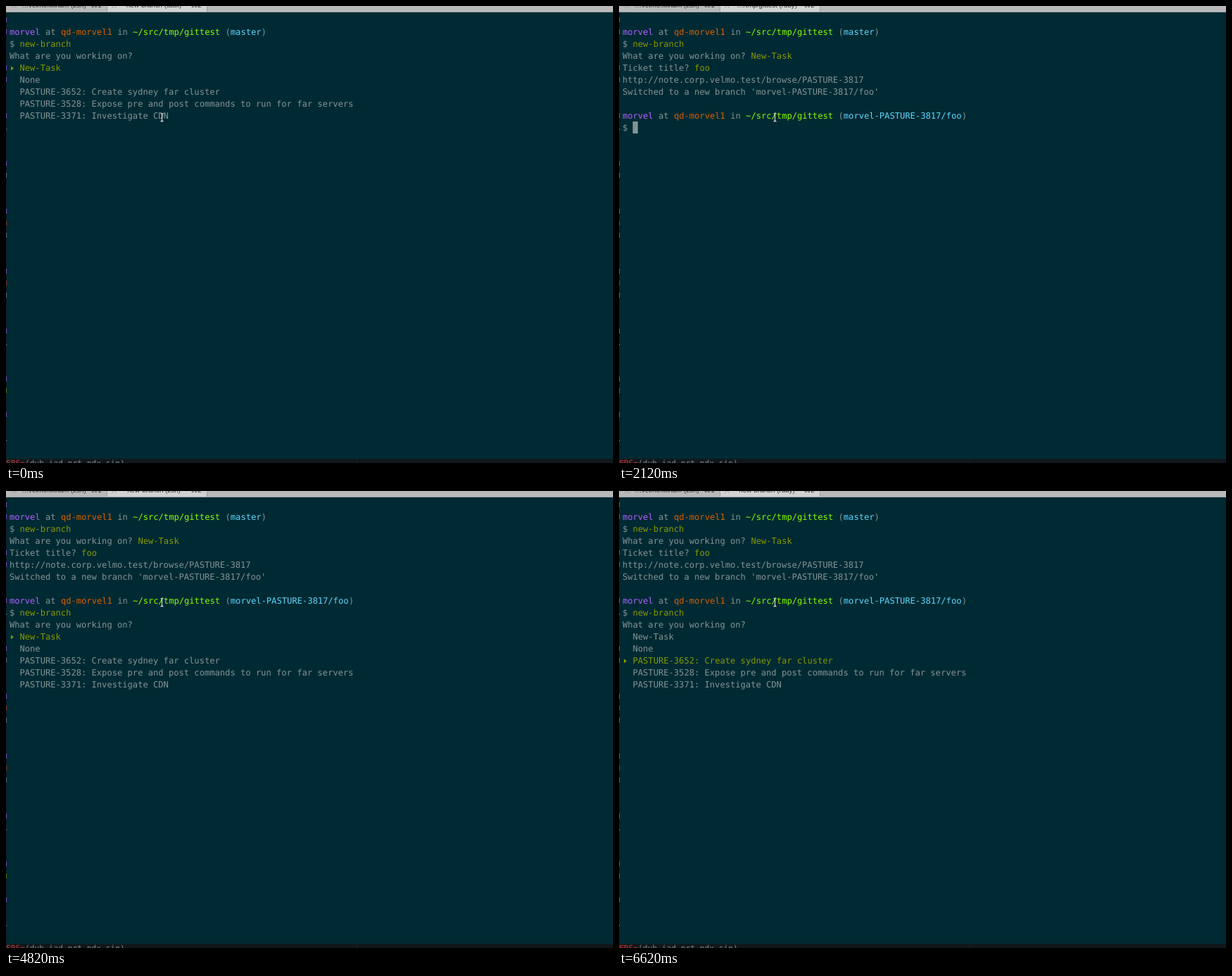
Recreate the animation shown at these times as an HTML page. Size 862x649 px, loop 8 s.

```html
<!DOCTYPE html>
<html lang="en">
<head>
<meta charset="utf-8">
<title>Terminal session</title>
<style>
  html, body { margin: 0; width: 100%; height: 100%; overflow: hidden; background: #002a33; }
  svg { display: block; width: 862px; height: 649px; }
  text { white-space: pre; text-rendering: geometricPrecision; }
  .term { font: 12.125px "DejaVu Sans Mono", monospace; }
  .below { font: 11.23px "DejaVu Sans Mono", monospace; }
  .tabs { font: 9.8px "Liberation Sans", "DejaVu Sans", sans-serif; text-anchor: middle; fill: #333; }
  .plain { fill: #839496; }
  .pick { fill: #859900; }
  .user { fill: #af5fff; }
  .host { fill: #d75f00; }
  .path { fill: #87ff00; }
  .branch { fill: #5fd7ff; }
  .red { fill: #c8382f; }
</style>
</head>
<body>
<svg viewBox="0 0 862 649">
  <rect width="862" height="649" fill="#002a33"/>

  <rect width="862" height="9" fill="#b9b9b9"/>
  <rect x="144" width="141" height="8" fill="#d2d2d2"/>
  <path d="M143.5 0V8M285.5 0V8" stroke="#9c9c9c"/>
  <path d="M0 8.5H862" stroke="#a3a9aa"/>
  <path d="M8 3l3.5-3.5l3.5 3.5M150 3l3.5-3.5l3.5 3.5" fill="none" stroke="#888" stroke-width=".8"/>
  <g class="tabs">
    <text x="68" y="2">…velmo.xx/iam (zsh)</text>
    <text x="128" y="2">⌘1</text>
    <text id="tab" x="210" y="2"></text>
    <text x="270" y="2">⌘2</text>
  </g>

  <g id="edge"></g>
  <g id="screen" class="term"></g>

  <rect y="643" width="862" height="6" fill="#10181c"/>
  <path d="M498.5 644V649" stroke="#18242a"/>
  <g class="below">
    <text x="0" y="653" class="red">ERS=</text>
    <text x="27" y="653" fill="#7d898b">(dub iad prt pdx sin)</text>
  </g>

  <path d="M219.5 152.5Q221.5 152.5 221.5 154.5V162Q221.5 164 219.5 164M223.5 152.5Q221.5 152.5 221.5 154.5M221.5 162Q221.5 164 223.5 164"
    fill="none" stroke="#dfe3e3" stroke-width="1.1"/>
</svg>
<script>
  const LOOP = 8000, LEFT = 4.9, COLUMN = 7.3, TOP = 28, ROW = 17;
  const byId = id => document.getElementById(id);
  const column = n => LEFT + n * COLUMN;
  const rowTop = n => TOP + n * ROW;

  // A line is a list of [style, text] pieces set one after another.
  const prompt = branch => [
    ['user', 'morvel'], ['plain', ' at '], ['host', 'qd-morvel1'], ['plain', ' in '],
    ['path', '~/src/tmp/gittest'], ['plain', ' ('], ['branch', branch], ['plain', ')']
  ];
  const plain = text => [['plain', text]];
  const answer = (question, reply, style = 'pick') => [['plain', question + ' '], [style, reply]];

  const question = 'What are you working on?';
  const options = [
    'New-Task',
    'None',
    'PASTURE-3652: Create sydney far cluster',
    'PASTURE-3528: Expose pre and post commands to run for far servers',
    'PASTURE-3371: Investigate CDN'
  ];
  const menu = chosen => [
    plain(question),
    ...options.map((text, i) => i === chosen
      ? [['pick', '▸ ' + text]]
      : plain('  ' + text))
  ];

  const command = answer('$', 'new-branch');
  const start = [prompt('master'), command];
  const asked = [...start, answer(question, 'New-Task')];
  const title = (text, style) => [...asked, answer('Ticket title?', text, style)];
  const created = [
    ...title('foo'),
    plain('http://note.corp.velmo.test/browse/PASTURE-3817'),
    plain("Switched to a new branch 'morvel-PASTURE-3817/foo'"),
    [],
    prompt('morvel-PASTURE-3817/foo')
  ];
  const ready = [...created, plain('$ ')];
  const again = [...created, command];
  const secondMenu = chosen => [...again, ...menu(chosen)];

  // Start time, tab title, lines, cursor as [column, row].
  const steps = [
    [0, 'new-branch (task)', [...start, ...menu(0)]],
    [300, 'new-branch (ruby)', title(''), [14, 3]],
    [1070, 'new-branch (ruby)', title('fo', 'plain'), [16, 3]],
    [1220, 'new-branch (ruby)', title('foo', 'plain'), [17, 3]],
    [1370, 'new-branch (ruby)', title('foo'), [0, 4]],
    [2120, '…/tmp/gittest (ruby)', ready, [2, 8]],
    [2420, '…/tmp/gittest (git)', ready, [2, 8]],
    [3020, '…/tmp/gittest (zsh)', ready, [2, 8]],
    [3470, '…/tmp/gittest (zsh)', again, [12, 8]],
    [4370, 'new-branch (zsh)', again, [0, 9]],
    [4820, 'new-branch (zsh)', secondMenu(0)],
    [5270, 'new-branch (ruby)', secondMenu(0)],
    [5570, 'new-branch (ruby)', secondMenu(1)],
    [6020, 'new-branch (ruby)', secondMenu(2)],
    [6170, 'new-branch (ruby)', secondMenu(3)],
    [6620, 'new-branch (ruby)', secondMenu(2)]
  ];

  function drawPiece(style, text, col, row) {
    const y = rowTop(row);
    if (text.startsWith('▸')) {
      return `<path class="${style}" d="M7 ${y + 6.5}l4 3l-4 3z"/>` +
        drawPiece(style, text.slice(2), col + 2, row);
    }
    return `<text class="${style}" x="${column(col)}" y="${y + 13}">${text}</text>`;
  }

  function drawLine(pieces, row) {
    let col = 0;
    return pieces.map(([style, text]) => {
      const piece = drawPiece(style, text, col, row);
      col += text.length;
      return piece;
    }).join('');
  }

  const drawCursor = ([col, row]) =>
    `<rect class="plain" x="${column(col)}" y="${rowTop(row)}" width="7.3" height="17"/>`;

  // Slivers of the window behind, one mark per text row.
  const edgeRows = {
    user: [-1, 0, 3, 4, 7, 11, 15, 20, 25, 29, 32],
    red: [16, 21],
    plain: [12, 17, 22],
    pick: [30]
  };
  const mark = (style, row, height = 7) =>
    `<rect class="${style}" y="${rowTop(row) + 12 - height}" width="1" height="${height}" opacity=".65"/>`;
  byId('edge').innerHTML = '<rect y="9" width="1" height="634" fill="#0b1d24"/>' +
    Object.entries(edgeRows).map(([style, rows]) => rows.map(r => mark(style, r)).join('')).join('') +
    [8, 26, 34].map(r => mark('plain', r, 2)).join('');

  let shown;
  function show(step) {
    if (step === shown) return;
    shown = step;
    const [, tab, lines, cursor] = step;
    byId('tab').textContent = tab;
    byId('screen').innerHTML = lines.map(drawLine).join('') + (cursor ? drawCursor(cursor) : '');
  }

  const origin = performance.now();
  function tick() {
    const time = (performance.now() - origin) % LOOP;
    show(steps.findLast(([from]) => from <= time));
    requestAnimationFrame(tick);
  }
  tick();
</script>
</body>
</html>
```
